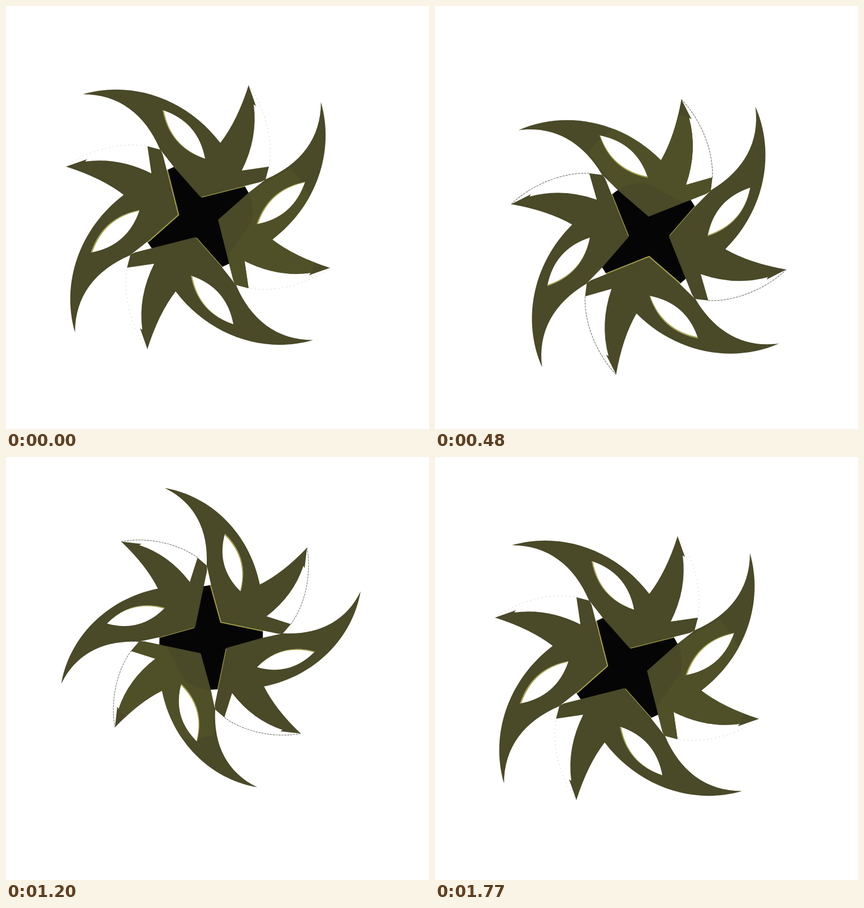
Animation, 748 px wide and 748 px high, one loop 1800 ms. Source, as an HTML page with a canvas:

```html
<!DOCTYPE html>
<html>
<head>
<meta charset="utf-8">
<style>
html, body { margin: 0; width: 100%; height: 100%; overflow: hidden; background: #fff; }
canvas { display: block; }
</style>
</head>
<body>
<canvas id="stage" width="748" height="748"></canvas>
<script>
const ctx = document.getElementById('stage').getContext('2d');
const STEP = 30, STEPS = 60, MID = 374;
const HUB = [339.5, 373.4];                    // centre of the star at rest
const TIP_ANGLE = 43.1 * Math.PI / 180, TIP_RADIUS = 298.4, MAX_REACH = 265.2;

const eye = 'M277 184Q340 205 352 270Q289 249 277 184Z';
const blade = new Path2D(
  'M136 156C222 131 319 163 379 242Q409 203 429 140L442 177L438 174' +
  'Q446 233 417 291L465 284L459 307L451 311L344 338L298 286L272 253' +
  'C246 192 200 156 136 156Z' + eye);
const rimArc = new Path2D('M429 140C455 175 474 232 465 284');
const core = new Path2D('M285 290L298 284L422 318L430 332L396 455L381 462L258 429L249 416Z');
const sheen = new Path2D(
  'M430 328Q440 360 434 382L393 440L395 500H430L537 480L545 457L585 420L522 310L503 287Z');

// The star repeated by quarter turns
function quarters(path) {
  const all = new Path2D();
  for (let i = 0; i < 4; i++) {
    all.addPath(path, new DOMMatrix()
      .translate(...HUB).rotate(90 * i).translate(-HUB[0], -HUB[1]));
  }
  return all;
}

const blades = quarters(blade);
const arcs = quarters(rimArc);
const inner = quarters(new Path2D(eye));
inner.addPath(core);
const rightBlade = new Path2D();
rightBlade.addPath(blade, new DOMMatrix()
  .translate(...HUB).rotate(90).translate(-HUB[0], -HUB[1]));

function draw(step) {
  const turn = -2 * Math.PI * step / (STEPS - 1);
  const atRest = step % (STEPS - 1) === 0;
  const tip = turn - TIP_ANGLE;
  const reach = TIP_RADIUS * Math.max(Math.abs(Math.cos(tip)), Math.abs(Math.sin(tip)));
  const size = Math.min(1, MAX_REACH / reach);  // the whole picture shrinks to keep the star in its box

  ctx.setTransform(1, 0, 0, 1, 0, 0);
  ctx.fillStyle = '#fff';
  ctx.fillRect(0, 0, 748, 748);
  ctx.scale(size, size);
  ctx.translate(MID, MID);
  ctx.rotate(turn);
  ctx.translate(-MID, -MID);

  ctx.fillStyle = '#050505';
  ctx.fill(core);

  // Lit thickness, seen only at the eyes and the core
  ctx.save();
  ctx.clip(inner);
  ctx.translate(2.2, 0.8);
  ctx.fillStyle = '#a3a145';
  ctx.fill(blades, 'evenodd');
  ctx.restore();

  ctx.fillStyle = '#4a4928';
  ctx.fill(blades, 'evenodd');

  ctx.save();
  ctx.clip(rightBlade, 'evenodd');
  ctx.fillStyle = '#505028';
  ctx.fill(sheen);
  ctx.restore();

  ctx.lineWidth = 1;
  ctx.strokeStyle = atRest ? '#a5a58c' : '#66665c';
  ctx.setLineDash(atRest ? [1, 6] : [4, 1.5]);
  ctx.stroke(arcs);
  ctx.setLineDash([]);
}

const start = performance.now();
function tick() {
  draw(Math.floor((performance.now() - start) / STEP) % STEPS);
  requestAnimationFrame(tick);
}
tick();
</script>
</body>
</html>
```
